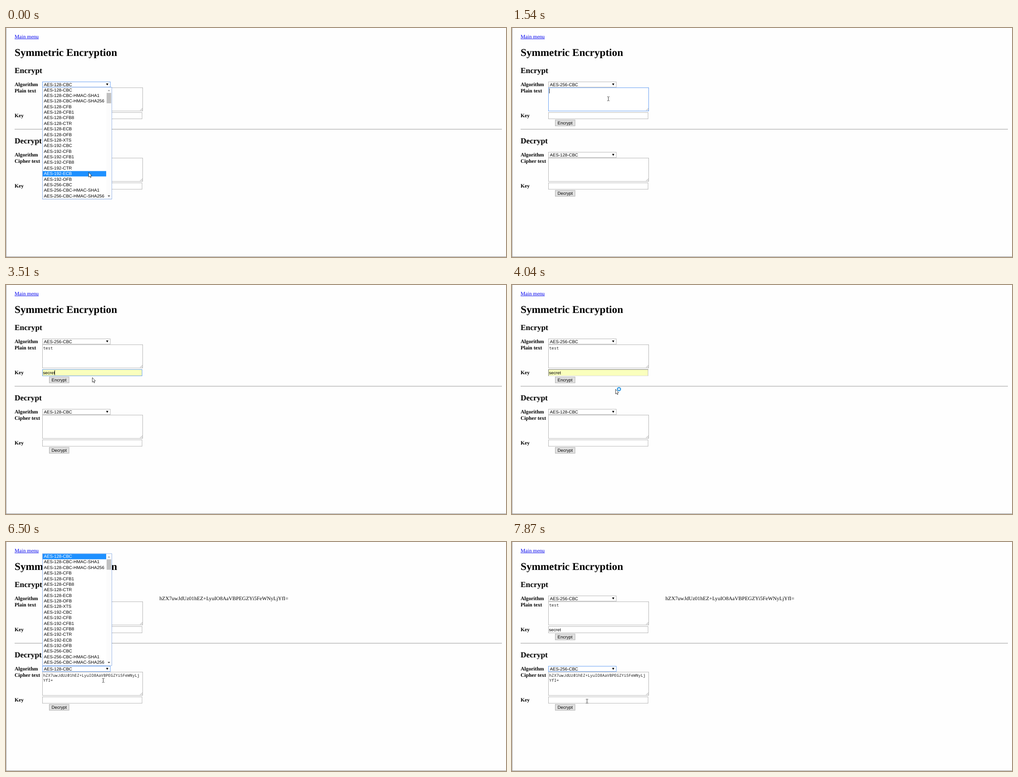
An HTML page with a canvas that plays this animation: 1103x508 px, repeating every 7.99 s.

```html
<!DOCTYPE html>
<html>
<head>
<meta charset="utf-8">
<title>Symmetric Encryption</title>
<style>
html, body { margin: 0; width: 100%; height: 100%; overflow: hidden; background: #fff; }
canvas { display: block; }
</style>
</head>
<body>
<canvas id="stage" width="1103" height="508"></canvas>
<script>
const ctx = document.getElementById('stage').getContext('2d');
const LOOP = 7990, ROW = 12.37, LINE = 0.85;
const SERIF = '11.6px "Liberation Serif", serif';
const BOLD = 'bold ' + SERIF;
const H1 = 'bold 23.2px "Liberation Serif", serif';
const H2 = 'bold 17.4px "Liberation Serif", serif';
const SANS = '9.68px "Liberation Sans", sans-serif';
const MONO = '8.87px "Noto Sans Mono", monospace';
const POPUP = 'bold 8px "Open Sans", sans-serif';
const PAGE = '#fefefe', GREY = '#a9a9a9', BLUE = '#4a8df0', INK = '#000';
const CIPHER = 'hZX7uwJdUz01hEZ+LyuIO8AaVBPEGZYi5FeWNyLjYfI=';

const modes = (bits, list) => list.split(' ').map(m => `AES-${bits}-${m}`);
const OPTIONS = [
  ...modes(128, 'CBC CBC-HMAC-SHA1 CBC-HMAC-SHA256 CFB CFB1 CFB8 CTR ECB OFB XTS'),
  ...modes(192, 'CBC CFB CFB1 CFB8 CTR ECB OFB'),
  ...modes(256, 'CBC CBC-HMAC-SHA1 CBC-HMAC-SHA256')
];

// Pointer steps: [ms, x, y, shape]
const POINTER = [
  [0, 182, 320, arrow], [120, 182, 327, arrow], [250, 182, 336, arrow], [380, 182, 345, arrow],
  [640, 190, 300, beam], [760, 200, 240, arrow], [890, 208, 195, beam], [1010, 213, 165, beam],
  [1140, 213, 157, beam], [1540, 212, 157, beam], [2350, 212, 172, beam], [2490, 211, 196, beam],
  [3500, 190, 205, arrow], [3640, 140, 209, arrow], [3780, 118, 210, arrow],
  [3920, 165, 222, busy], [4040, 228, 231, busy], [4200, 280, 230, busy], [4340, 318, 228, busy],
  [4490, 328, 236, arrow], [4640, 334, 262, arrow], [4780, 337, 285, arrow], [4920, 338, 296, arrow],
  [5250, 295, 320, beam], [5400, 247, 340, beam], [5540, 222, 351, beam], [5680, 219, 335, beam],
  [5820, 219, 310, beam], [5960, 220, 281, arrow], [6240, 219, 284, arrow], [6380, 216, 296, beam],
  [6500, 214, 307, beam], [6630, 200, 268, arrow], [6790, 182, 252, arrow], [6950, 170, 241, arrow],
  [7270, 165, 290, beam], [7430, 167, 330, beam], [7590, 168, 348, beam], [7720, 167, 351, beam],
  [7870, 165, 353, beam]
];
const FOCUS = [[0, 'algorithm1'], [1140, 'text1'], [2490, 'key1'], [3780, ''], [6100, 'algorithm2']];
const PLAIN = [[0, ''], [1940, 't'], [2080, 'tes'], [2210, 'test']];
const KEY = [[0, ''], [2790, 's'], [2910, 'secret']];

const latest = (steps, t) => steps.filter(s => s[0] <= t).pop();

function text(str, x, y, font, color = INK) {
  ctx.font = font;
  ctx.fillStyle = color;
  ctx.fillText(str, x, y);
}

function rect(x, y, w, h, color) {
  ctx.fillStyle = color;
  ctx.fillRect(x, y, w, h);
}

function box(x, y, w, h, border, fill = '#fff') {
  rect(x, y, w, h, border);
  rect(x + LINE, y + LINE, w - 2 * LINE, h - 2 * LINE, fill);
}

function path(points, fill, stroke) {
  ctx.beginPath();
  points.forEach(([x, y]) => ctx.lineTo(x, y));
  if (fill) {
    ctx.closePath();
    ctx.fillStyle = fill;
    ctx.fill();
  }
  if (stroke) {
    ctx.lineWidth = 0.8;
    ctx.strokeStyle = stroke;
    ctx.stroke();
  }
}

function triangle(x, y, w, h, color) {
  path([[x - w, y], [x + w, y], [x, y + h]], color);
}

function arrow(x, y) {
  const shape = [[0, 0], [0, 10.3], [2.3, 8.2], [3.9, 11.8], [5.4, 11.1], [3.9, 7.6], [7, 7.4]];
  path(shape.map(([a, b]) => [x + a + 0.4, y + b + 0.4]), '#fff', '#111');
}

function beam(x, y) {
  rect(x, y - 4, 1, 8, '#333');
  for (const serifY of [y - 5, y + 4]) {
    rect(x - 2, serifY, 2, 1, '#444');
    rect(x + 1, serifY, 2, 1, '#444');
  }
}

function busy(x, y) {
  arrow(x, y);
  ctx.beginPath();
  ctx.arc(x + 8, y, 3.5, 0, 7);
  ctx.fillStyle = '#e4f4ff';
  ctx.fill();
  ctx.lineWidth = 2;
  ctx.strokeStyle = '#1f8fdf';
  ctx.stroke();
}

function textBlock(y, lines, border) {
  box(80, y, 222, 52.5, border);
  lines.forEach((line, i) => text(line, 82, y + 10.8 + i * 11.3, MONO, '#222'));
  path([[296, y + 51], [301, y + 46]], null, '#888');
  path([[299, y + 51], [301, y + 49]], null, '#888');
}

function form(y, f, focus) {
  const edge = name => focus === name + f.id ? BLUE : GREY;
  text(f.title, 19, y + 99.5, H2);
  text('Algorithm', 19, y + 128.8, BOLD);
  text(f.label, 19, y + 142.8, BOLD);
  text('Key', 19, y + 197.8, BOLD);
  box(80, y + 119, 150.5, 12.5, edge('algorithm'));
  text(f.algorithm, 83.5, y + 128.5, SANS);
  triangle(223.3, y + 123, 2.5, 4.5, INK);
  textBlock(y + 132, f.lines, edge('text'));
  box(80, y + 187, 220.5, 15, edge('key'), f.filled ? '#faffbd' : '#fff');
  if (f.filled && focus !== 'key' + f.id) {
    rect(80, y + 201, 220.5, 1, '#ddd');
    rect(300, y + 187, 1, 15, '#ddd');
    rect(80, y + 187, 220.5, 1, '#777');
    rect(80, y + 187, 1, 15, '#777');
  }
  text(f.key, 81.5, y + 197.8, SANS);
  box(95, y + 203.5, 44.5, 14, '#a6a6a6', '#e0e0e0');
  text(f.title, 100.6, y + 213.5, SANS);
}

function dropdown(y, pointerY) {
  const row = Math.floor((pointerY - y) / ROW);
  const active = row >= 0 && row < OPTIONS.length ? row : 0;
  box(80, y, 153.7, 249, '#6f9ade');
  rect(81, y + 0.8 + active * ROW, 140, ROW - 0.4, '#1e90ff');
  OPTIONS.forEach((name, i) =>
    text(name, 83.5, y + 9.6 + i * ROW, SANS, i === active ? '#fff' : INK));
  rect(221, y + 1, 12, 247, '#fcfcfc');
  rect(222, y + 13, 10, 23, '#c1c1c1');
  triangle(227, y + 9, 2.7, -3, '#a3a3a3');
  triangle(227, y + 240.5, 2.7, 3, '#404040');
}

function keyPopup(selected) {
  rect(80, 202, 221, 19, PAGE);
  if (selected) rect(81, 203, 219, 16, '#dcdcdc');
  rect(80, 202, 1, 19, '#ccc');
  text('secret', 86.7, 214, POPUP);
}

function draw(t) {
  const between = (from, to) => t >= from && t < to;
  const [, px, py, pointer] = latest(POINTER, t);
  const focus = latest(FOCUS, t)[1];
  const plain = latest(PLAIN, t)[1];
  const key = latest(KEY, t)[1];
  const loaded = t >= 4490;

  ctx.textRendering = 'geometricPrecision';
  rect(0, 0, 1103, 508, PAGE);
  rect(0, 0, 1, 508, '#a0a0a0');
  rect(0, 507, 1103, 1, '#929292');
  text('Main menu', 19, 22.7, SERIF, '#00e');
  rect(19, 23.8, 53.2, LINE, '#00e');
  text('Symmetric Encryption', 19, 62, H1);
  rect(19, 224, 1075, 1, '#999');

  form(0, {
    id: 1, title: 'Encrypt', label: 'Plain text', lines: [plain], key,
    algorithm: t < 510 ? 'AES-128-CBC' : 'AES-256-CBC', filled: between(2910, 4490)
  }, focus);
  form(156.2, {
    id: 2, title: 'Decrypt', label: 'Cipher text', key: '',
    lines: loaded ? [CIPHER.slice(0, 40), CIPHER.slice(40)] : [],
    algorithm: t < 7110 ? 'AES-128-CBC' : 'AES-256-CBC'
  }, focus);
  if (loaded) text(CIPHER, 338.5, 128.6, SERIF);

  if (focus === 'text1' && !between(1660, 1940)) rect(82 + plain.length * 5.32, 134, 1, 11, '#222');
  if (focus === 'key1') {
    ctx.font = SANS;
    rect(Math.round(81 + ctx.measureText(key).width), 189, 1, 11, '#222');
  }
  if (between(2790, 3360)) keyPopup(t >= 2910);
  if (t < 510) dropdown(131, py);
  if (between(6100, 7110)) dropdown(25.5, py);
  pointer(px, py);
}

function tick() {
  draw(performance.now() % LOOP);
  requestAnimationFrame(tick);
}
tick();
</script>
</body>
</html>
```
